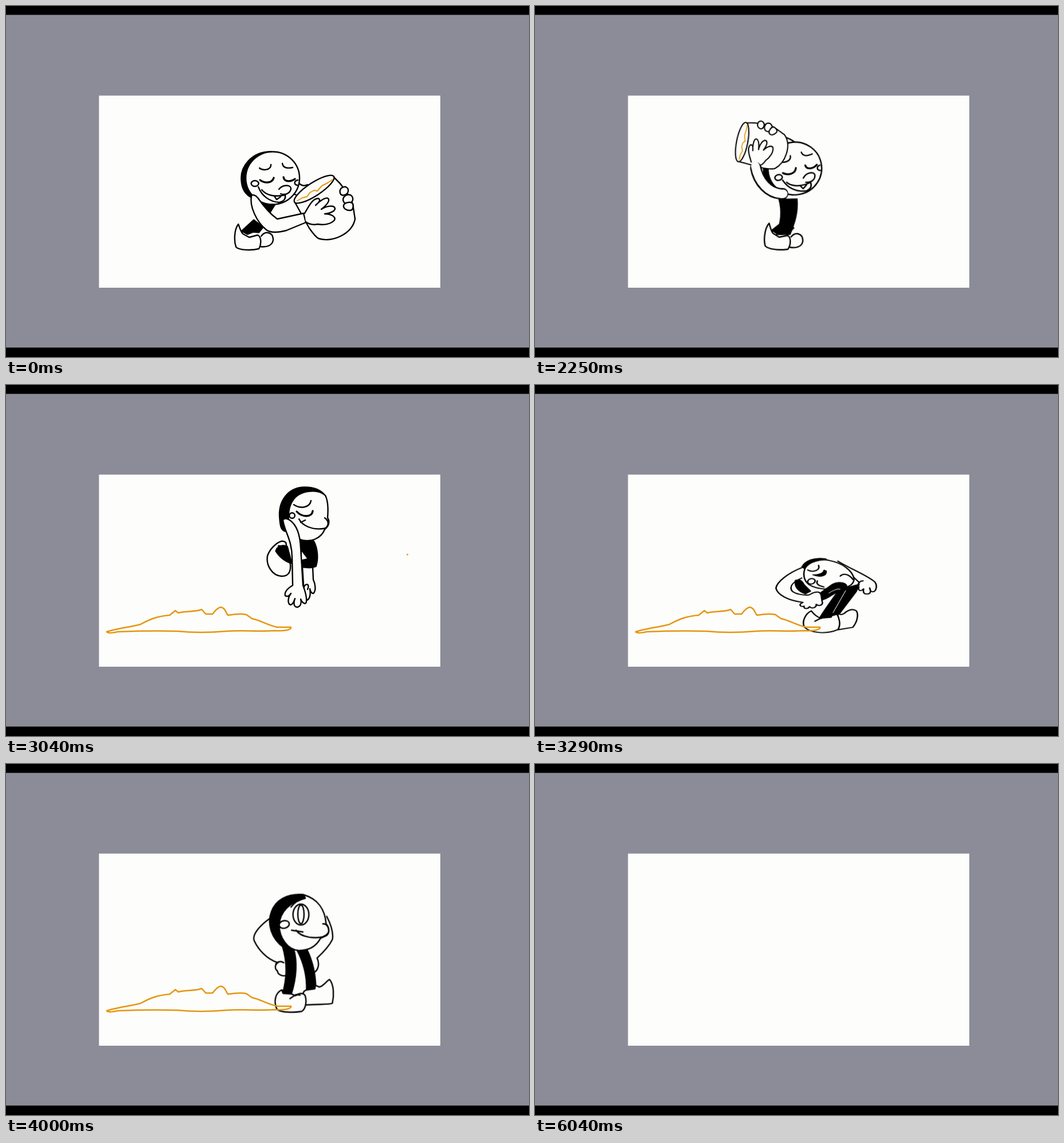
An HTML page that plays this animation: 914 by 613 pixels, repeating every 6.17 s.

```html
<!DOCTYPE html>
<html lang="en">
<head>
<meta charset="utf-8">
<title>Tossed mug</title>
<style>
html, body { margin: 0; width: 100%; height: 100%; overflow: hidden; background: #000; }
svg { display: block; width: 914px; height: 613px; }
path, ellipse, circle { fill: #fdfdfc; stroke: #000; stroke-width: 2.4; stroke-linecap: round; stroke-linejoin: round; }
.ink { fill: #000; stroke-width: 1.5; }
.line { fill: none; }
.bold { fill: none; stroke-width: 3.3; }
.juice { fill: none; stroke: #e5960f; stroke-width: 2.5; }
.limb { fill: none; stroke-width: 20; }
.sleeve { fill: none; stroke: #fdfdfc; stroke-width: 15; }

/* Every step is held until the next one; 1% is 61.7 ms. */
.act { animation: 6170ms step-end infinite; }
#hug { animation-name: hug; transform-origin: 420px 425px; }
#dip { animation-name: dip; transform-origin: 420px 425px; }
#wind { animation-name: wind; transform-origin: 430px 425px; }
#swing { animation-name: swing; transform-origin: 460px 390px; }
#leap { animation-name: leap; transform-origin: 510px 300px; }
#crouch { animation-name: crouch; transform-origin: 505px 433px; }
#stand { animation-name: stand; transform-origin: 505px 433px; }
#splash { animation-name: splash; transform-origin: 365px 428px; }
#pool { animation-name: pool; transform-origin: 350px 431px; }
#fly { animation-name: fly; }
#drop { animation-name: drop; }

@keyframes hug {
  0% { opacity: 1; transform: none; }
  28.363% { opacity: 0; }
  31.766% { opacity: 1; transform: rotate(-6deg); }
  33.063% { transform: rotate(-25deg); }
  34.521%, 100% { opacity: 0; transform: none; }
}
@keyframes dip {
  0% { opacity: 0; transform: none; }
  28.363% { opacity: 1; }
  30.47% { transform: scale(1.01, .97); }
  31.766%, 100% { opacity: 0; transform: none; }
}
@keyframes wind {
  0% { opacity: 0; transform: none; }
  34.521% { opacity: 1; transform: rotate(12deg); }
  36.142% { transform: rotate(4deg); }
  37.763% { transform: none; }
  39.222% { transform: rotate(3deg); }
  40.518% { transform: rotate(9deg); }
  41.815%, 100% { opacity: 0; transform: none; }
}
@keyframes swing {
  0% { opacity: 0; transform: none; }
  41.815% { opacity: 1; transform: translate(-14px, 10px) rotate(-10deg); }
  43.273% { transform: none; }
  44.57% { transform: translate(10px, -2px) rotate(8deg); }
  45.218%, 100% { opacity: 0; transform: none; }
}
@keyframes leap {
  0% { opacity: 0; transform: none; }
  45.218% { opacity: 1; transform: translate(-8px, 14px) rotate(-32deg); }
  45.867% { transform: translate(-5px, 9px) rotate(-22deg); }
  46.515% { transform: translate(-3px, 5px) rotate(-14deg); }
  47.325% { transform: translate(-2px, 3px) rotate(-8deg); }
  47.973% { transform: translate(-1px, 1px) rotate(-4deg); }
  48.622% { transform: rotate(-2deg); }
  49.27% { transform: none; }
  49.918% { transform: translateY(18px); }
  51.215% { transform: translateY(42px); }
  52.674%, 100% { opacity: 0; transform: none; }
}
@keyframes crouch {
  0% { opacity: 0; transform: none; }
  52.674% { opacity: 1; transform: scale(1.05, .82); }
  54.132% { transform: scale(1.03, .9); }
  56.077% { transform: none; }
  60.129% { transform: scale(1, 1.04); }
  60.778% { transform: scale(.99, 1.1); }
  61.426%, 100% { opacity: 0; transform: none; }
}
@keyframes stand {
  0% { opacity: 0; transform: none; }
  61.426% { opacity: 1; transform: scale(1.04, .9); }
  62.236% { transform: scale(1.02, .95); }
  62.884% { transform: scale(1, .99); }
  63.533% { transform: scale(.99, 1.012); }
  65.478% { transform: none; }
  97.893%, 100% { opacity: 0; }
}
@keyframes splash {
  0% { opacity: 0; transform: none; }
  39.222% { opacity: 1; transform: scale(.45, 1.1); }
  40.518% { transform: scale(.65, 1.08); }
  41.815% { transform: scale(.85, 1.05); }
  43.273% { transform: none; }
  44.57% { transform: scale(1.25, .72); }
  45.218% { transform: scale(1.5, .5); }
  45.867%, 100% { opacity: 0; transform: none; }
}
@keyframes pool {
  0% { opacity: 0; transform: none; }
  45.867% { opacity: 1; transform: scale(.65, 1.7); }
  46.515% { transform: scale(.74, 1.5); }
  47.325% { transform: scale(.84, 1.3); }
  47.973% { transform: scale(.92, 1.15); }
  48.622% { transform: scale(.97, 1.05); }
  49.27% { transform: none; }
  97.893%, 100% { opacity: 0; }
}
@keyframes fly {
  0% { opacity: 0; transform: none; }
  45.218% { opacity: 1; transform: translate(625px, 220px) rotate(60deg); }
  45.867% { transform: translate(698px, 230px) rotate(100deg); }
  46.515% { transform: translate(768px, 250px) rotate(140deg); }
  47.325% { transform: translate(836px, 280px) rotate(180deg); }
  47.973%, 100% { opacity: 0; transform: none; }
}
@keyframes drop {
  0% { opacity: 0; transform: none; }
  46.515% { opacity: 1; transform: translate(-56px, -20px); }
  47.325% { transform: translate(-40px, -16px); }
  47.973% { transform: translate(-26px, -11px); }
  48.622% { transform: translate(-12px, -6px); }
  49.27% { transform: none; }
  49.918% { transform: translate(14px, 9px); }
  51.215% { transform: translate(40px, 34px); }
  52.674%, 100% { opacity: 0; transform: none; }
}
</style>
</head>
<body>
<svg viewBox="0 0 914 613">
  <defs>
    <g id="vessel">
      <path d="M505 343L530 388C537 398 541 403 546 406C570 414 605 398 610 372L606 346C598 326 585 310 573 299Z"/>
      <ellipse cx="538.5" cy="320" rx="41" ry="11.5" transform="rotate(-33 538.5 320)"/>
      <path class="juice" style="stroke-width:2" d="M509 340L518 335L526 333L531 326L538 322L544 323L552 314L562 309L571 303"/>
    </g>
    <g id="grip">
      <path d="M522 362C530 348 536 336 546 336C551 339 546 344 541 348C550 339 562 331 564 338C565 344 556 351 551 355C560 349 574 347 575 354C574 360 564 362 557 363C568 363 577 368 574 374C568 381 555 383 545 381C535 383 528 380 524 377"/>
      <path d="M584 327C582 319 588 315 594 316C600 319 599 326 594 329C588 332 585 330 584 327"/>
      <path d="M589 339C589 332 596 328 602 330C608 334 607 341 602 344C594 347 590 344 589 339"/>
      <path d="M590 348C592 343 602 341 606 345C608 351 606 357 601 357C594 357 589 353 590 348"/>
    </g>
    <g id="face">
      <path class="ink" d="M464 254C430 253 408 280 411 306C412 320 419 330 429 335L440 330L434 270Z"/>
      <ellipse cx="466" cy="300.5" rx="47" ry="46"/>
      <path class="line" d="M443 283C449 288 463 287 463 277M483 275C484 283 492 284 501 282"/>
      <path class="bold" d="M444 304C452 310 465 310 468 300M485 299C486 307 497 308 505 302"/>
      <ellipse cx="435" cy="310" rx="6.5" ry="5"/>
      <path class="line" d="M510 304C503 305 503 312 509 313"/>
      <path d="M441 316C447 332 461 342 478 343C486 341 489 336 488 330C470 334 455 331 447 321"/>
      <path class="line" d="M469 332L473 338L480 333"/>
      <path d="M477 320C484 311 498 312 498 319C497 327 488 331 480 328"/>
    </g>
    <g id="feet">
      <path d="M446 402C452 393 466 393 467 408C466 418 456 422 444 420"/>
      <path d="M406 381C399 390 398 410 402 421C408 427 430 427 442 424C447 415 446 403 440 400L425 404L414 398C410 394 408 386 406 381Z"/>
      <path class="ink" d="M411 393L433 373L450 386L442 396L432 395L422 399Z"/>
    </g>
  </defs>

  <rect y="15.5" width="914" height="581" fill="#8c8c98"/>
  <rect x="162.5" y="156.5" width="596.5" height="335.5" fill="#fdfdfc"/>

  <g id="hug" class="act">
    <use href="#feet"/>
    <path class="line" d="M500 327L512 332M510 307C515 314 521 315 527 312"/>
    <use href="#vessel"/>
    <path class="ink" d="M445 338L471 346L461 362L452 362Z"/>
    <use href="#face"/>
    <path d="M429 331C425 350 438 377 455 391C462 396 475 396 490 392L524 378L520 362L474 372C460 362 447 345 440 335C436 330 431 329 429 331"/>
    <use href="#grip"/>
  </g>

  <g id="dip" class="act" style="--w:2.2">
    <path class="line" d="M516 313C519 318 523 320 528 319"/>
    <path d="M445 397C458 394 468 402 468 410C466 420 456 422 443 420"/>
    <path d="M405 382C399 390 400 412 402 420C410 428 432 426 443 424C445 414 444 402 440 398L420 403L412 395C408 390 406 386 405 382Z"/>
    <path class="ink" d="M410 392L438 371L452 350L467 348L471 371L450 390L436 394L421 403Z"/>
    <path d="M508 346L528 382L554 416C575 419 606 402 616 376C612 350 598 328 579 309Z"/>
    <ellipse cx="543" cy="328" rx="39.5" ry="11" transform="rotate(-29 543 328)"/>
    <path class="juice" style="stroke-width:2" d="M512 348L521 344L531 341L538 332L545 328L550 329L556 323L567 320L576 311"/>
    <path class="ink" d="M470 259C440 256 415 280 415 305C416 320 421 331 431 336L444 330L440 270Z"/>
    <ellipse cx="471.5" cy="304" rx="47" ry="44.5"/>
    <path class="line" d="M444 289C450 293 464 293 466 283M485 279L486 288L502 288.5"/>
    <path class="bold" d="M447 307C455 314 466 315 470 307M488 304C491 312 500 314 511 308"/>
    <ellipse cx="438" cy="314" rx="6.5" ry="5.5"/>
    <path class="line" d="M516 306C510 307 510 315 516 316"/>
    <path d="M442 322C447 336 465 347 480 347C490 347 494 340 493 334C473 340 458 335 449 326"/>
    <path class="line" d="M473 339L479 345L485 338"/>
    <path d="M482 325C487 317 500 315 502 322C502 331 492 337 484 334"/>
    <path d="M429 337C426 352 438 380 451 390C462 401 480 400 498 395L528 385L529 364L512 373L480 377C465 370 452 350 440 336C436 331 431 332 429 337"/>
    <path d="M528 362C534 350 545 342 555 341C559 345 553 350 548 353C560 344 572 342 574 348C574 354 566 358 561 360C572 358 580 361 580 367C577 373 568 373 562 373C572 374 577 378 573 382C566 388 548 389 528 384"/>
    <ellipse cx="589" cy="330" rx="10" ry="7.5" transform="rotate(-20 589 330)"/>
    <ellipse cx="598" cy="341.5" rx="9" ry="8"/>
    <ellipse cx="601" cy="354.5" rx="8.5" ry="9"/>
  </g>

  <g id="wind" class="act">
    <path class="ink" d="M420 338L452 335C456 360 450 380 444 398L420 400C426 380 428 360 420 338Z"/>
    <use href="#feet"/>
    <path class="limb" d="M448 256C436 240 424 236 410 238"/>
    <path class="sleeve" d="M448 256C436 240 424 236 410 238"/>
    <use href="#face" transform="translate(-22 -18) rotate(-16 466 300)"/>
    <g transform="translate(382 250) rotate(-50) scale(.85) translate(-557 -355)">
      <use href="#vessel"/><use href="#grip"/>
    </g>
    <path class="limb" d="M426 328C402 330 382 310 376 286"/>
    <path class="sleeve" d="M427 328C402 330 382 310 375 283"/>
  </g>

  <g id="swing" class="act">
    <path class="line" style="stroke-width:1.8" d="M424 163C445 147 485 144 516 154M419 179C429 167 440 162 452 162M413 345C412 360 414 370 416 377"/>
    <path class="line" d="M452 164C490 157 550 163 585 188L582 202L553 195M551 205L573 210L570 226L546 216M545 231L560 233L567 242L559 248L546 243"/>
    <path class="line" d="M452 164L440 186L457 178M440 186L444 192L439 200L442 222L466 229M450 172L484 164L458 178L482 171M472 178L492 174L476 184L502 182L480 192L508 190L486 199L506 200"/>
    <path class="ink" d="M455 224L465 231C461 258 464 280 476 299C455 290 451 252 455 224Z"/>
    <path d="M547 240C553 272 546 296 525 303C505 308 480 303 470 297C460 270 468 225 490 212C515 202 540 220 547 240Z"/>
    <path class="ink" d="M471 268C471 230 482 205 506 206C492 214 483 232 479 256Z"/>
    <path class="line" d="M497 254C497 276 514 290 538 291M499 252C502 270 515 280 530 276C544 272 551 258 547 241M526 290L528 280L536 277M512 244C522 250 536 246 545 239"/>
    <ellipse cx="508" cy="239" rx="5" ry="6"/>
    <path d="M525 213C534 202 549 199 552 206C553 214 546 221 536 221Z"/>
    <path d="M442 222C438 206 440 193 447 190C452 192 452 197 455 200C455 188 460 178 468 178C474 182 472 192 470 200L474 236L466 240L464 218C458 226 448 226 442 222Z"/>
    <path d="M470 276C478 250 492 225 514 204L508 192C511 183 520 186 524 194C526 182 530 175 537 177C544 180 537 191 534 198C543 190 553 192 552 199C548 206 538 208 530 215C512 236 498 255 484 280Z"/>
    <path class="ink" d="M468 285C475 302 510 309 517 302C512 315 514 325 516 333L497 349C480 358 462 366 447 375C440 371 440 364 445 360C462 356 480 347 489 338C486 320 484 308 468 285Z"/>
    <path class="line" d="M427 345C420 358 421 385 427 396L434 402L438 397M427 345L425 336L431 340L434 326L439 342L443 332L446 346M441 375L446 390L442 394M449 404L456 402L455 388L460 384L461 396L467 395L466 384L472 388L473 377L465 368M456 372L460 383M428 332L429 317L433 324L432 331M448 338L452 319L454 333L449 338M455 345L462 332L464 340L468 338M484 336L487 322L490 336"/>
  </g>

  <g id="leap" class="act">
    <path d="M536 318L537 340C541 348 542 360 537 364C533 364 532 360 531 356C533 368 530 376 524 376L520 350L518 318Z"/>
    <path class="line" d="M521 352C525 345 531 348 527 357"/>
    <path d="M489 275C480 267 462 284 457 298C454 315 465 333 482 334C492 334 498 328 497 314Z"/>
    <path class="ink" d="M471 290C474 280 485 278 492 282L500 312C492 310 480 304 471 290Z"/>
    <path class="line" d="M476 281C483 280 489 284 491 289"/>
    <path class="ink" d="M512 270L538 272C546 286 546 306 542 317C533 321 525 319 516 318Z"/>
    <path d="M517 291L526 303L517 305Z" style="stroke:none"/>
    <path class="ink" d="M478 235C474 200 495 178 522 178C540 178 552 184 559 194L510 230L488 256C481 254 479 248 478 235Z"/>
    <path d="M558 193C564 204 563 220 562 232C566 238 565 246 557 252C551 268 532 276 514 270L494 244C493 225 494 212 501 202C512 184 545 180 558 193Z"/>
    <path class="line" d="M503 209C515 217 531 214 533 202M512 234C518 246 535 253 553 251C563 251 567 239 557 232M515 240L523 236"/>
    <path class="bold" d="M508 221C518 232 535 231 536 220"/>
    <circle cx="500" cy="228" r="4.8"/>
    <path d="M484 236C486 255 500 270 500 302L501 350C492 355 486 362 488 368C492 371 496 367 498 364C492 372 492 382 497 384C502 383 503 378 505 373C502 381 503 388 509 388C515 387 517 380 515 374C518 382 525 384 525 378C526 368 522 358 519 350L515 285C514 262 509 245 496 236C491 233 486 232 484 236"/>
  </g>

  <g id="crouch" class="act">
    <path class="line" d="M528 280C548 296 580 312 590 325C594 332 592 342 588 345C582 346 582 342 581 337C584 346 582 350 576 350C570 350 570 344 571 339C566 346 561 342 563 336C560 328 564 322 570 322M550 309L564 326"/>
    <path d="M529 426L553 421C560 410 563 395 559 386C552 380 545 384 538 392C533 396 530 392 528 392Z"/>
    <path d="M484 386C474 392 468 408 472 420C482 434 510 436 528 426C534 415 530 400 526 391L500 402C492 398 488 393 484 386Z"/>
    <path class="line" d="M490 408L504 399"/>
    <path class="ink" d="M468 292C474 279 488 271 508 275L512 280L474 298Z"/>
    <path d="M474 294C480 282 500 274 515 279C535 284 553 300 555 318C555 332 540 339 525 340C505 341 490 338 480 330C470 320 470 305 474 294Z"/>
    <path class="line" d="M478 299C488 305 499 299 496 289M532 312C536 306 546 306 553 319M494 322C491 329 497 333 505 335"/>
    <path class="ink" d="M486 309C495 310 504 306 505 299L509 301C510 312 499 316 486 309Z"/>
    <ellipse cx="484" cy="323" rx="6.5" ry="5.5" transform="rotate(-35 484 323)"/>
    <path class="ink" d="M544 336L564 329L559 345L531 392L515 398Z"/>
    <path class="ink" d="M495 351L519 329C530 322 544 326 543 335L517 400L497 402C505 385 518 362 527 346C519 351 511 361 502 363Z"/>
    <path class="line" style="stroke:#fdfdfc;stroke-width:1" d="M541 343L520 390M513 348C520 342 528 338 532 340"/>
    <path d="M470 293C445 305 426 325 425 338C428 352 445 364 470 368C462 372 465 378 472 376C470 382 478 383 481 377C486 383 493 378 492 372C498 378 504 372 502 366C500 356 502 350 496 346C490 345 486 348 480 352C470 353 457 350 452 344C447 335 452 325 468 316"/>
    <path class="ink" d="M457 321C464 318 468 320 472 330L483 344L474 350C462 345 455 335 457 321Z"/>
  </g>

  <g id="stand" class="act">
    <path class="line" d="M463 270C442 284 429 300 433 310C440 325 455 342 475 348C468 352 470 360 474 362C474 369 484 372 490 370M471 352C471 347 480 344 485 348M561 268C570 285 573 298 571 308C565 320 555 330 544 340C549 350 546 362 538 365"/>
    <path class="ink" d="M508 326L526 324C534 340 542 365 542 392L525 396C526 370 520 348 508 326Z"/>
    <path class="ink" d="M482 318L503 324C510 345 508 375 499 402L483 401C490 375 492 350 482 318Z"/>
    <path d="M524 421C545 419 565 421 571 418C574 405 574 386 566 377C560 380 556 388 548 390L541 387L540 393L526 395C520 396 519 401 519 404"/>
    <path d="M482 395C470 400 467 415 473 428C480 435 505 434 517 432C524 428 526 415 523 405C519 398 510 402 506 405L499 402L484 401Z"/>
    <path class="line" d="M496 410L507 403L514 404M494 396L497 402"/>
    <path class="ink" d="M486 323C462 307 455 280 463 260C470 240 490 228 520 230L530 250L515 327Z"/>
    <path d="M521 231C545 238 558 256 560 281C566 287 566 297 561 301L550 306C543 319 530 327 512 327C492 326 477 305 477 282C479 262 491 246 521 237Z"/>
    <path class="line" d="M498 252C504 244 513 239 523 237M554 281C561 280 566 288 564 296C558 305 545 306 530 304C518 302 511 298 507 292M499 292L519 295M520 231L523 236"/>
    <ellipse cx="515.5" cy="265" rx="14" ry="18"/>
    <ellipse cx="515.5" cy="264.5" rx="5.5" ry="16"/>
    <ellipse cx="486" cy="282" rx="9" ry="6.5" transform="rotate(-12 486 282)"/>
  </g>

  <g id="splash" class="act">
    <path class="juice" d="M369 270C358 275 344 295 340 315C334 335 332 345 337 357C342 363 346 366 345 378C346 390 346 396 342 401C330 404 318 406 313 413C310 420 312 429 318 430C350 427 380 424 405 425C415 427 428 427 430 423C427 419 415 421 404 417C400 410 402 406 406 404C408 398 403 394 400 391C406 388 410 383 405 379C399 375 396 365 397 352C398 340 402 330 409 323C396 330 391 345 392 360C391 368 384 374 385 381C387 387 393 388 394 392C392 400 394 406 398 408C390 413 385 408 379 411C370 413 362 411 358 407C363 400 357 390 359 372C360 362 364 358 360 350C352 335 347 320 352 305C355 292 362 280 369 270Z"/>
    <path class="juice" d="M371 360C378 357 381 362 377 372C376 380 380 385 375 391C368 398 361 396 362 385C361 375 364 364 371 360Z"/>
    <ellipse class="juice" cx="376.5" cy="352" rx="3" ry="2"/>
  </g>

  <path id="pool" class="act juice" d="M176 431C190 426 215 423 235 418C250 410 262 404 286 402L296 394L301 398C315 394 330 397 342 392L349 400L361 400C367 392 372 388 376 388C384 390 384 398 388 402C400 400 412 399 420 401L430 408C445 411 455 419 474 423L498 423C499 428 485 430 470 429C440 431 415 428 385 430C350 433 320 432 300 430C260 429 220 430 195 431C188 433 178 434 176 431Z"/>

  <g id="fly" class="act"><use href="#vessel" transform="translate(-557 -355)"/></g>
  <g id="drop" class="act"><circle cx="701.5" cy="296" r="1.5" style="fill:#e5960f;stroke:none"/></g>
</svg>
</body>
</html>
```
